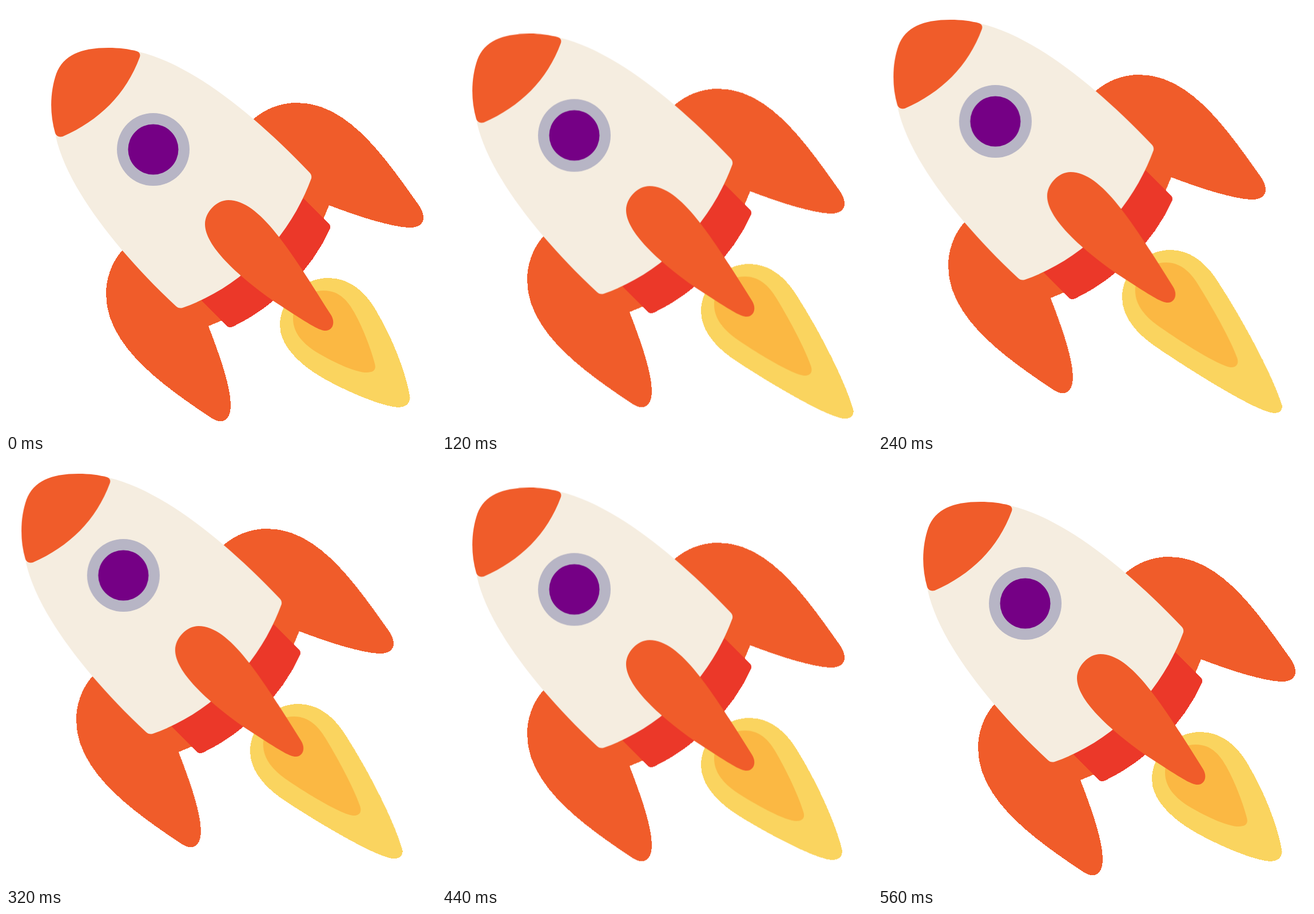
Animation, 752 px wide and 744 px high, one loop 600 ms. Source, as an HTML page:

```html
<!DOCTYPE html>
<html lang="en">
<head>
<meta charset="utf-8">
<title>Rocket</title>
<style>
  html, body { margin: 0; width: 100%; height: 100%; overflow: hidden; background: #fff; }
  svg { display: block; width: 752px; height: 744px; }

  .orange { fill: #f05c2a; }
  .red { fill: #eb3829; }
  .cream { fill: #f5ede0; }
  .rim { fill: #b7b5c5; }
  .glass { fill: #750085; }
  .outer { fill: #fad45f; }
  .inner { fill: #fbb843; }
  .fin, .red, .outer { shape-rendering: crispEdges; }

  /* The loop is 15 ticks of 40 ms, so every segment moves in steps. */
  .rocket { animation: fly 600ms infinite; }
  .outer { animation: outer 600ms infinite; }
  .inner { animation: inner 600ms infinite; }

  @keyframes fly {
    0% { transform: translate(0, 0); animation-timing-function: steps(7, end); }
    46.666% { transform: translate(-60.9px, -57.2px); animation-timing-function: steps(7, end); }
    93.333%, 100% { transform: translate(0, 0); }
  }

  /* Flames: quick growth, short hold, slow shrink. */
  @keyframes outer {
    0% {
      d: path("M564 475C601 475 628 500 645 528C675 577 699 640 706 680C709 694 699 701 686 701C655 699 588 670 548 646C510 623 479 591 479 558C479 514 518 475 564 475Z");
      animation-timing-function: steps(4, end);
    }
    26.666%, 40% {
      d: path("M564 475C601 475 629 502 647 531C690 597 739 688 757 741C762 753 757 760 745 760C711 758 574 669 535 642C505 621 479 592 479 558C479 514 518 475 564 475Z");
      animation-timing-function: steps(8, end);
    }
    93.333%, 100% {
      d: path("M564 475C601 475 628 500 645 528C675 577 699 640 706 680C709 694 699 701 686 701C655 699 588 670 548 646C510 623 479 591 479 558C479 514 518 475 564 475Z");
    }
  }
  @keyframes inner {
    0% {
      d: path("M556 497C584 497 599 517 609 535C626 565 640 605 645 625C648 636 642 640 631 640C608 640 560 616 536 600C516 586 502 568 502 546C502 520 524 497 556 497Z");
      animation-timing-function: steps(4, end);
    }
    26.666%, 40% {
      d: path("M556 497C584 497 601 518 611 534C635 572 669 632 680 663C684 674 679 680 669 680C645 677 565 624 540 606C518 590 502 570 502 546C502 520 524 497 556 497Z");
      animation-timing-function: steps(8, end);
    }
    93.333%, 100% {
      d: path("M556 497C584 497 599 517 609 535C626 565 640 605 645 625C648 636 642 640 631 640C608 640 560 616 536 600C516 586 502 568 502 546C502 520 524 497 556 497Z");
    }
  }
</style>
</head>
<body>
<svg viewBox="0 0 752 744">
  <g class="rocket">
    <!-- side fins -->
    <path class="orange fin" d="M432 198C455 178 482 169 509 169C595 169 658 257 722 348C726 354 730 361 730 370C730 382 719 388 703 387C665 384 607 364 565 348L555 372L500 330Z"/>
    <path class="orange fin" d="M203 427C184 449 175 476 175 503C175 588 262 655 354 716C364 723 370 726 378 725C389 723 393 711 393 696C392 660 372 606 354 559L378 549L340 500Z"/>
    <!-- engine -->
    <path class="red" d="M520 336L564 379Q569 384 566 390C535 460 470 525 397 560Q390 563 385 557.5L342 515Z"/>
    <!-- flame -->
    <path class="outer" d="M564 475C601 475 628 500 645 528C675 577 699 640 706 680C709 694 699 701 686 701C655 699 588 670 548 646C510 623 479 591 479 558C479 514 518 475 564 475Z"/>
    <path class="inner" d="M556 497C584 497 599 517 609 535C626 565 640 605 645 625C648 636 642 640 631 640C608 640 560 616 536 600C516 586 502 568 502 546C502 520 524 497 556 497Z"/>
    <!-- body, nose and window -->
    <path class="cream" d="M232 80C320 100 430 185 531 291Q535 295 534 301C496 405 412 491 309 527Q302 529 297 524C189 423 106 313 87 228Z"/>
    <path class="orange" d="M229 79Q236 82 234 89C210 154 163 200 99 228Q89 230 86 222C76 187 77 150 88 118C100 86 131 73 179 73C198 73 214 75 229 79Z"/>
    <circle class="rim" cx="257.5" cy="250.5" r="63.5"/>
    <circle class="glass" cx="257.5" cy="250.5" r="44"/>
    <!-- front fin -->
    <path class="orange" d="M389 339C443 339 497 426 568 539C577 553 571 567 559 567C548 567 532 557 469 516C402 469 348 418 348 381C348 360 368 339 389 339Z"/>
  </g>
</svg>
</body>
</html>
```
